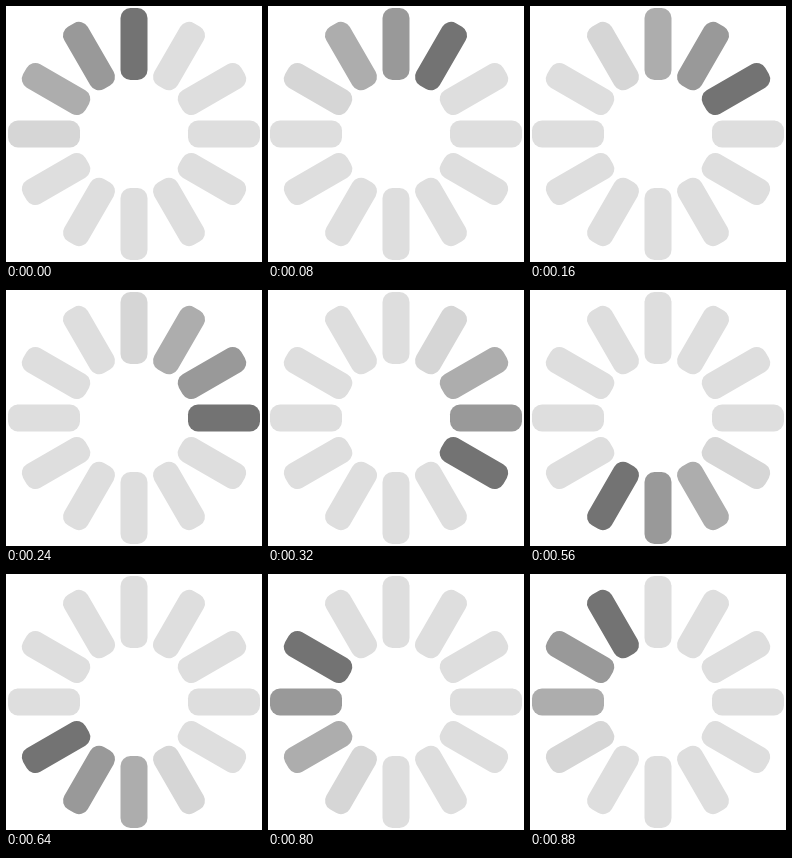
An HTML page that plays this animation: 256x256 px, repeating every 960 ms.

```html
<!DOCTYPE html>
<html lang="en">
<head>
<meta charset="utf-8">
<title>Loading spinner</title>
<style>
html, body { margin: 0; width: 100%; height: 100%; overflow: hidden; background: #fff; }
svg { display: block; width: 100vw; height: 100vh; }
</style>
</head>
<body>
<svg id="spinner" viewBox="0 0 256 256"></svg>
<script>
const COUNT = 12, STEP_MS = 80;
const TRAIL = ['#737373', '#999', '#adadad', '#d6d6d6'];
const REST = '#dedede';

const bars = Array.from({ length: COUNT }, (_, i) => {
  const bar = document.createElementNS('http://www.w3.org/2000/svg', 'rect');
  const attributes = {
    x: 114.5, y: 2, width: 27, height: 72, rx: 10,
    transform: `rotate(${i * 360 / COUNT} 128 128)`
  };
  for (const name in attributes) bar.setAttribute(name, attributes[name]);
  return spinner.appendChild(bar);
});

function draw(time) {
  const head = Math.floor(time / STEP_MS) % COUNT;
  bars.forEach((bar, i) => {
    const age = (head - i + COUNT) % COUNT;
    bar.setAttribute('fill', TRAIL[age] || REST);
  });
}

const start = performance.now();
function tick() {
  draw(performance.now() - start);
  requestAnimationFrame(tick);
}
tick();
</script>
</body>
</html>
```
